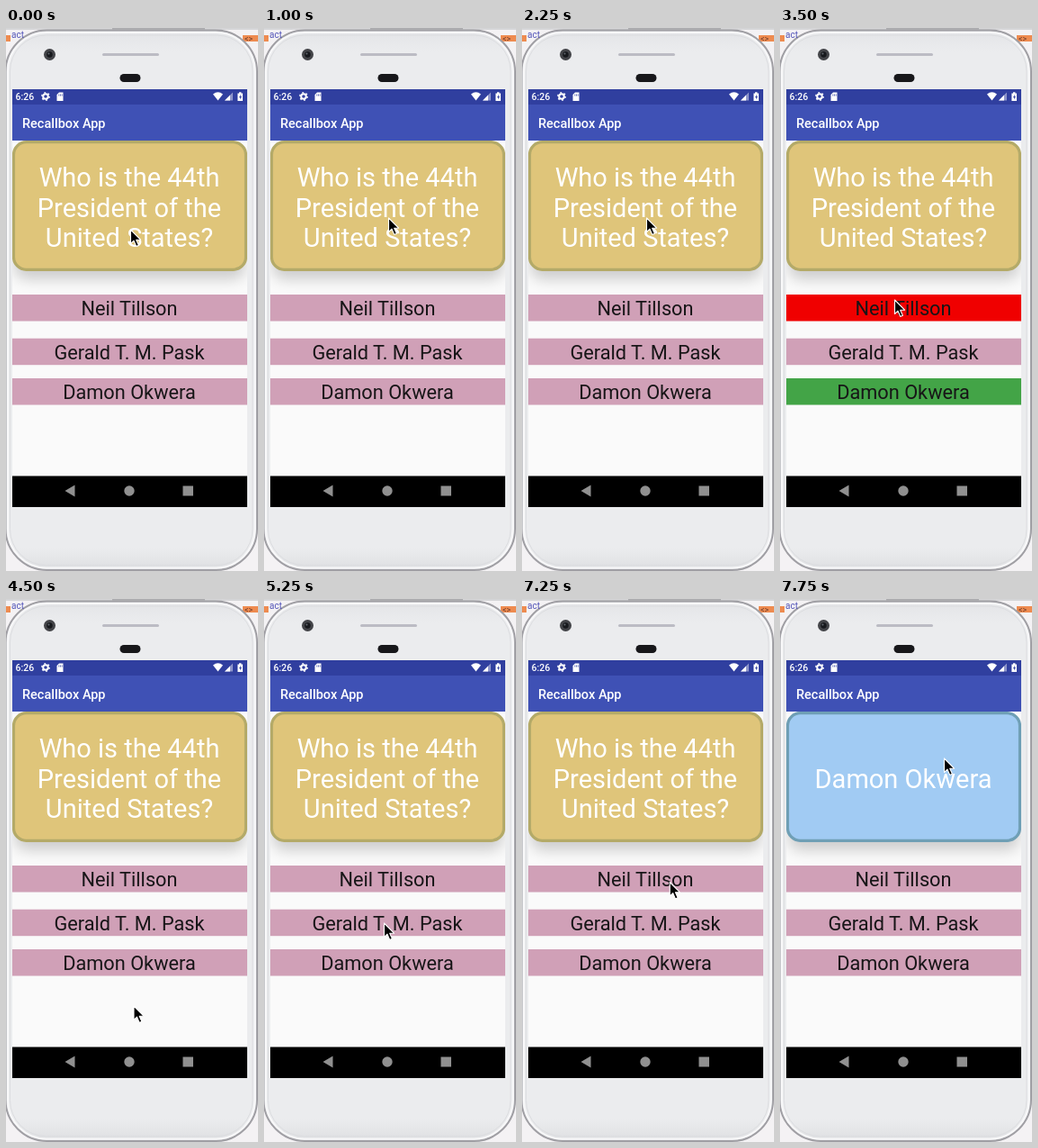
Write an HTML page that moves like this. It is 280 px wide and 603 px high and loops after 8000 ms.

```html
<!DOCTYPE html>
<html lang="en">
<head>
<meta charset="utf-8">
<title>Quiz card phone</title>
<style>
  html, body { margin: 0; width: 100%; height: 100%; overflow: hidden; background: #f4f2f4; }
  svg { display: block; width: 100%; height: 100%; }
  text { font-family: Roboto, Arial, sans-serif; }
  .big { font-size: 29px; fill: #fff; text-anchor: middle; }
  .option { font-size: 21.75px; fill: #171517; text-anchor: middle; }
</style>
</head>
<body>
<svg viewBox="0 0 280 603">
  <defs>
    <linearGradient id="shell" x2="0" y2="1">
      <stop offset="0" stop-color="#e3e4e7"/>
      <stop offset=".04" stop-color="#ebecee"/>
      <stop offset=".96" stop-color="#ebecee"/>
      <stop offset="1" stop-color="#dedfe2"/>
    </linearGradient>
    <filter id="soft" x="-15%" y="-15%" width="130%" height="145%">
      <feGaussianBlur stdDeviation="8"/>
    </filter>
    <clipPath id="screen"><rect x="7" y="68" width="261" height="464"/></clipPath>
  </defs>

  <!-- window behind the phone -->
  <rect width="280" height="603" fill="#f4f2f4"/>
  <rect width="280" height="2" fill="#d5d5d7"/>
  <rect x="118" width="103" height="1.500" fill="#a9a9ac"/>
  <rect y="8" width="5" height="7" fill="#ee8b50"/>
  <rect x="263" y="8" width="17" height="7" fill="#ee8b50"/>
  <text x="265" y="15" font-size="9" fill="#6b3a2a">&lt;&gt;</text>

  <!-- phone -->
  <rect x="-.5" y="2.500" width="279.500" height="599.500" rx="46" fill="url(#shell)" stroke="#a09fa4" stroke-width="2"/>
  <rect x="2" y="5" width="274.500" height="594.500" rx="43" fill="none" stroke="#f8f8f9" stroke-width="2"/>
  <rect x="4.500" y="8" width="269.500" height="588.500" rx="40" fill="none" stroke="#dcdde0"/>
  <text x="6" y="11" font-size="10" fill="#5254b8">act</text>
  <circle cx="48.500" cy="29.500" r="6.500" fill="#434448"/>
  <circle cx="48.500" cy="29.500" r="3.200" fill="#17191d"/>
  <circle cx="47.500" cy="28.500" r="1" fill="#656a72"/>
  <rect x="107" y="28" width="63" height="3" rx="1.500" fill="#bcbcc4"/>
  <rect x="126.500" y="51" width="23" height="9" rx="4.500" fill="#17171a"/>

  <!-- screen -->
  <g clip-path="url(#screen)">
    <rect x="7" y="68" width="261" height="464" fill="#fafafa"/>
    <rect x="9" y="142" width="257" height="137" rx="14" fill="#000" opacity=".18" filter="url(#soft)"/>
    <rect x="7" y="68" width="261" height="17" fill="#303f9f"/>
    <rect x="7" y="85" width="261" height="40" fill="#3f51b5"/>
    <text x="18" y="110.500" font-size="14.500" font-weight="500" fill="#fff">Recallbox App</text>
    <g fill="#fff">
      <text x="10.500" y="80" font-size="10.500" font-weight="500">6:26</text>
      <circle cx="44" cy="76" r="2.800" fill="none" stroke="#fff" stroke-width="2"/>
      <circle cx="44" cy="76" r="4.200" fill="none" stroke="#fff" stroke-width="1.400" stroke-dasharray="1.800 2.600"/>
      <path d="M59 71.500h4.500v9.500h-7v-7z"/>
      <path d="M58.800 73.500v2m1.700-2v2m1.700-2v2" stroke="#303f9f" stroke-width=".7"/>
      <path d="M230 73.500q5.500-4.500 11 0l-5.500 7z"/>
      <path d="M252 71.500v9h-9z" opacity=".45"/>
      <path d="M249 74.500v6h-6z"/>
      <path d="M259 71.200h2.400v1.200h1.600v8.600h-5.600v-8.600h1.600z"/>
      <path d="M260.700 73.700l-1.700 3.500h1.200v2.400l1.700-3.500h-1.200z" fill="#303f9f"/>
    </g>
    <rect id="card" x="8.500" y="126.700" width="258" height="141.600" rx="14" stroke-width="3.200"/>
    <g id="question" class="big">
      <text x="137" y="175.500">Who is the 44th</text>
      <text x="137" y="209.500">President of the</text>
      <text x="137" y="243.300">United States?</text>
    </g>
    <text id="answer" class="big" x="137" y="209.500">Damon Okwera</text>
    <g id="options"></g>
    <rect x="7" y="497.500" width="261" height="35" fill="#000"/>
    <g fill="#909090">
      <path d="M65.500 514l11-6.500v13z"/>
      <circle cx="137" cy="514" r="5.700"/>
      <rect x="196.500" y="508.500" width="11.500" height="11"/>
    </g>
  </g>

  <path id="cursor" d="M0 0v15.500l3.500-3.300 2.700 6.200 2.700-1.200-2.700-6h4.900z"
        fill="#000" stroke="#fff" stroke-width="1.100" stroke-linejoin="round"/>
</svg>
<script>
const LOOP = 8000, STEP = 250;
const PINK = '#d0a0b7', RED = '#f00000', GREEN = '#43a447';
const $ = id => document.getElementById(id);

// pointer stops: time, x, y
const path = [
  [0, 138.500, 224], [1000, 138.500, 211], [2750, 138.500, 211],
  [3250, 127.500, 302], [3750, 127.500, 302], [4250, 142, 452], [4500, 142, 452],
  [5250, 133.500, 360], [5500, 133.500, 360], [6000, 141, 452], [6250, 141, 452],
  [6500, 125.500, 402], [6750, 125.500, 402], [7000, 146, 452],
  [7500, 182.500, 177], [8000, 182.500, 177]
];

// picked answer: from, until, index
const picks = [[3500, 4500, 0], [5500, 6250, 1], [6750, 7250, 2]];
const RIGHT = 2;

const bars = [[296, 'Neil Tillson'], [344.7, 'Gerald T. M. Pask'], [389, 'Damon Okwera']].map(([y, name]) => {
  const add = (tag, attrs) => {
    const el = document.createElementNS('http://www.w3.org/2000/svg', tag);
    for (const k in attrs) el.setAttribute(k, attrs[k]);
    return $('options').appendChild(el);
  };
  const bar = add('rect', { x: 7, y, width: 261, height: 29.5 });
  add('text', { x: 137, y: y + 23.4, class: 'option' }).textContent = name;
  return bar;
});

function pointer(t) {
  const i = path.findIndex(p => p[0] > t);
  const [t0, x0, y0] = path[i - 1], [t1, x1, y1] = path[i];
  const k = (t - t0) / (t1 - t0);
  return [x0 + (x1 - x0) * k, y0 + (y1 - y0) * k];
}

function draw(time) {
  const t = Math.floor(time % LOOP / STEP) * STEP;
  const flipped = t === 2000 || t >= 7750;
  $('card').setAttribute('fill', flipped ? '#a1cbf3' : '#dfc57a');
  $('card').setAttribute('stroke', flipped ? '#6f9fb5' : '#b4aa68');
  $('question').style.display = flipped ? 'none' : '';
  $('answer').style.display = flipped ? '' : 'none';

  const pick = picks.find(([from, until]) => t >= from && t < until);
  bars.forEach((bar, i) => {
    const color = !pick ? PINK : i === RIGHT ? GREEN : i === pick[2] ? RED : PINK;
    bar.setAttribute('fill', color);
  });
  $('cursor').setAttribute('transform', `translate(${pointer(t)})`);
}

const start = performance.now();
function tick() {
  draw(performance.now() - start);
  requestAnimationFrame(tick);
}
tick();
</script>
</body>
</html>
```
